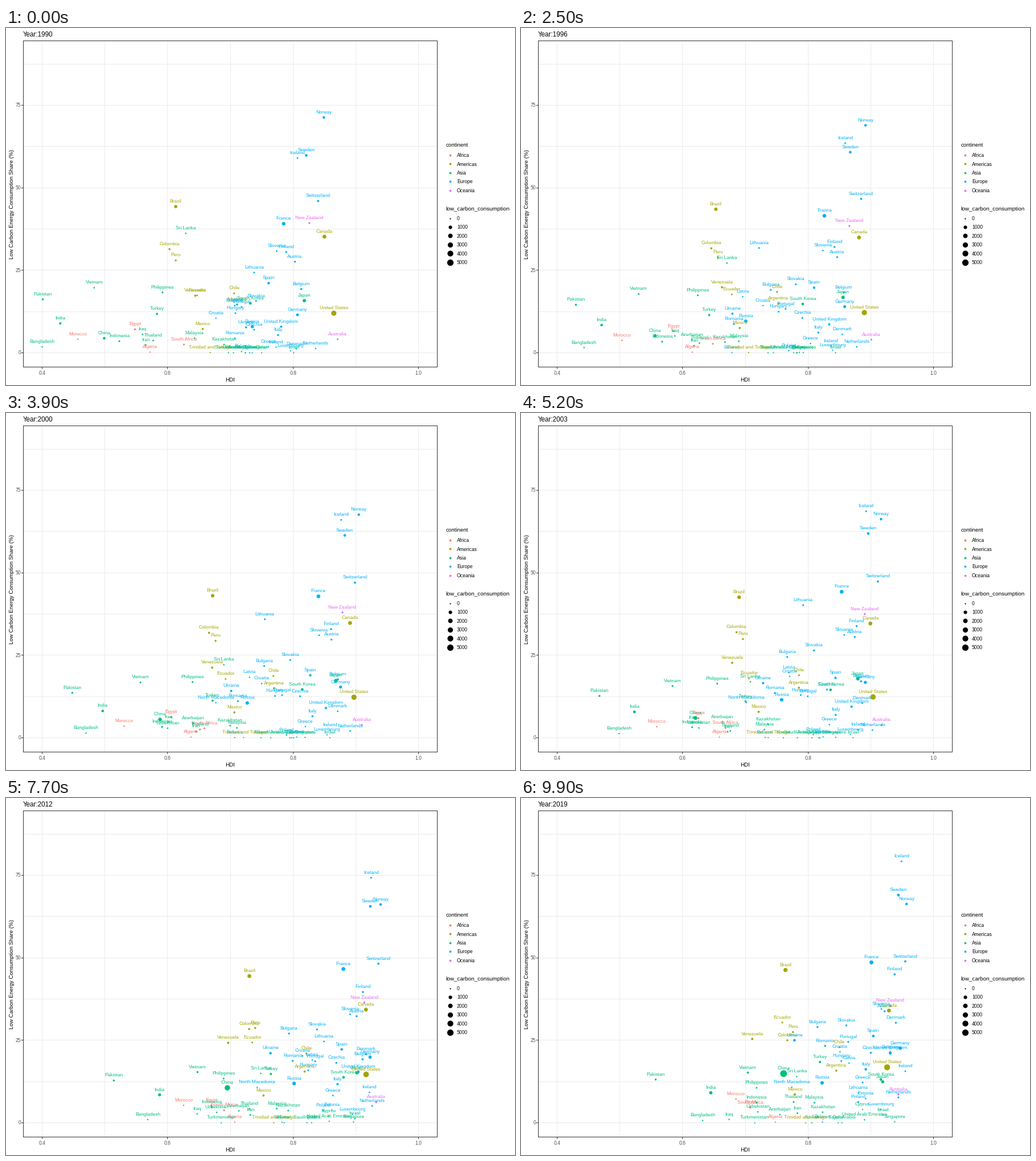
Animation, 894 px wide and 626 px high, one loop 10 s. Source, as a matplotlib script:

```python
import math

import matplotlib.pyplot as plt
import numpy as np
from matplotlib.animation import FuncAnimation

W, H, DPI = 894, 626, 100
FRAMES, INTERVAL = 100, 100
FIRST, MIDDLE, LAST = 1990, 2004, 2019
PX = 72 / DPI  # points per pixel

AFRICA, AMERICAS, ASIA = "#F8766D", "#A3A500", "#00BF7D"
EUROPE, OCEANIA = "#00B0F6", "#E76BF3"
GRID, DARK, GREY = "#EBEBEB", "#333333", "#4D4D4D"
LEFT, RIGHT, TOP, BOTTOM = 30, 757, 22, 594

plt.rcParams.update({"font.family": "Liberation Sans", "text.hinting": "native"})

fig = plt.figure(figsize=(W / DPI, H / DPI), dpi=DPI, facecolor="white")
ax = fig.add_axes((0, 0, 1, 1))
ax.set(xlim=(0, W), ylim=(H, 0))
ax.axis("off")


def stage_x(hdi):
    return 63.5 + 1101.7 * (hdi - 0.4)


def stage_y(share):
    return 569.5 - 5.787 * share


def diameter(consumption):
    return 2.2 + 0.127 * math.sqrt(consumption)


def text(x, y, s, size, color="black", ha="left", va="baseline", **kw):
    return ax.text(x, y, s, fontsize=size * PX, color=color, ha=ha, va=va, **kw)


def line(xs, ys, color, z=1):
    """One-pixel line through pixel centres."""
    xs, ys = np.floor(xs) + 0.5, np.floor(ys) + 0.5
    ax.plot(xs, ys, color=color, lw=PX, zorder=z, snap=False, solid_capstyle="projecting")


def dots(x, y, diam, color):
    return ax.scatter(x, y, s=(np.asarray(diam) * PX) ** 2, c=color, linewidths=0, zorder=3)


class Country:
    """Moves from one (HDI, share) point to another; via is a share on the way."""

    def __init__(self, name, color, begin, end, via=None, energy=300, growth=1, dip=0, start=FIRST):
        self.name, self.color, self.start = name, color, start
        (self.hdi, s0), (self.hdi_end, s1) = begin, end
        self.shares = (s0, (s0 + s1) / 2 if via is None else via, s1)
        self.energy, self.growth, self.dip = energy, growth, dip
        self.label = text(0, 0, name, 8.4, color, "center", zorder=5)

    def at(self, year):
        u = max(0, (year - self.start) / (LAST - self.start))
        # Highly developed countries gain early, the others steadily
        hdi = self.hdi + (self.hdi_end - self.hdi) * u ** (1.54 - 1.1 * self.hdi)
        t = (year - FIRST) / 6
        hdi -= self.dip * (t * math.exp(1 - t)) ** 2
        share = np.interp(year, (FIRST, MIDDLE, LAST), self.shares)
        used = self.energy * (1 + (self.growth - 1) * u) * share / 100
        return stage_x(hdi), stage_y(share), diameter(used)


DIP = 0.063  # setback of the nineties

countries = [
    Country("Algeria", AFRICA, (0.572, 0.2), (0.748, 0.2)),
    Country("Argentina", AMERICAS, (0.711, 14.6), (0.845, 15.8), energy=800),
    Country("Australia", OCEANIA, (0.871, 4.1), (0.944, 8.6), via=3.8, energy=1400),
    Country("Austria", EUROPE, (0.803, 27.6), (0.922, 33.8)),
    Country("Azerbaijan", ASIA, (0.604, 3.3), (0.755, 2.5), via=4.8, start=1995),
    Country("Bangladesh", ASIA, (0.4, 1.8), (0.632, 0.7)),
    Country("Belarus", EUROPE, (0.664, 0), (0.823, 0.2), start=1995),
    Country("Belgium", EUROPE, (0.813, 19.3), (0.931, 21.4), via=17, energy=750),
    Country("Brazil", AMERICAS, (0.613, 44.3), (0.764, 46.3), via=42.5, energy=1700, growth=2),
    Country("Bulgaria", EUROPE, (0.707, 14.3), (0.815, 29), via=25),
    Country("Canada", AMERICAS, (0.85, 35.2), (0.929, 34), energy=3700),
    Country("Chile", AMERICAS, (0.706, 18), (0.85, 22.9), via=19),
    Country("China", ASIA, (0.499, 4.4), (0.761, 14.9), via=6.1, energy=7900, growth=5),
    Country("Colombia", AMERICAS, (0.603, 31.4), (0.767, 25), via=32, energy=400),
    Country("Croatia", EUROPE, (0.677, 10.5), (0.851, 21.5), via=19, energy=50),
    Country("Cyprus", ASIA, (0.731, 0), (0.887, 4), via=0, energy=30),
    Country("Czechia", EUROPE, (0.738, 7), (0.9, 21.2), via=15, energy=480),
    Country("Denmark", EUROPE, (0.805, 1.2), (0.94, 30.3), via=11),
    Country("Ecuador", AMERICAS, (0.647, 17.4), (0.759, 30.4), via=18, energy=150),
    Country("Egypt", AFRICA, (0.548, 7.1), (0.708, 4.7), energy=900),
    Country("Estonia", EUROPE, (0.735, 0), (0.892, 7.3), via=0.3, energy=50),
    Country("Finland", EUROPE, (0.789, 30.5), (0.938, 45), via=34),
    Country("France", EUROPE, (0.785, 39.1), (0.901, 48.6), via=44.5, energy=2800),
    Country("Germany", EUROPE, (0.807, 11.5), (0.947, 22.6), energy=4000),
    Country("Greece", EUROPE, (0.761, 1.8), (0.887, 12.2), via=4.1),
    Country("Hungary", EUROPE, (0.708, 12), (0.853, 18.7), via=13),
    Country("Iceland", EUROPE, (0.807, 59), (0.949, 79.2), energy=60),
    Country("India", ASIA, (0.429, 8.9), (0.645, 9.1), via=7.8, energy=2600, growth=3.5),
    Country("Indonesia", ASIA, (0.523, 3.5), (0.718, 6.1), via=3.2, energy=1500),
    Country("Iran", ASIA, (0.565, 2.4), (0.783, 2.9), via=1.8, energy=1500),
    Country("Iraq", ASIA, (0.56, 5.6), (0.674, 1), via=4.5),
    Country("Ireland", EUROPE, (0.773, 1.7), (0.955, 15.6), via=2.5, energy=180),
    Country("Israel", ASIA, (0.801, 0), (0.919, 2.4), via=0),
    Country("Italy", EUROPE, (0.776, 5.4), (0.892, 16.2), via=7, energy=1900),
    Country("Japan", ASIA, (0.818, 15.8), (0.919, 12.4), via=18, energy=5500),
    Country("Kazakhstan", ASIA, (0.69, 2.5), (0.824, 3.2), via=4.2, energy=700, dip=DIP),
    Country("Kuwait", ASIA, (0.705, 0), (0.806, 0)),
    Country("Latvia", EUROPE, (0.71, 14.6), (0.866, 18.1), via=20, energy=40, dip=DIP),
    Country("Lithuania", EUROPE, (0.738, 24.3), (0.881, 9), via=41, energy=130, dip=DIP),
    Country("Luxembourg", EUROPE, (0.796, 0.6), (0.916, 4.1), via=1, energy=45),
    Country("Malaysia", ASIA, (0.643, 4.4), (0.81, 6.1), via=2.4, energy=800),
    Country("Mexico", AMERICAS, (0.656, 7.2), (0.779, 8.6), energy=1800),
    Country("Morocco", AFRICA, (0.457, 4.1), (0.685, 7.2), via=3.3, energy=120),
    Country("Netherlands", EUROPE, (0.836, 1.3), (0.944, 7.7), via=2.4, energy=1000),
    Country("New Zealand", OCEANIA, (0.826, 39.3), (0.931, 35.5), energy=220),
    Country("North Macedonia", EUROPE, (0.677, 10.5), (0.774, 10.8), energy=30, start=2000),
    Country("Norway", EUROPE, (0.849, 71.3), (0.957, 66.3), via=66, energy=500),
    Country("Pakistan", ASIA, (0.401, 16.2), (0.557, 13.1), via=12.5, energy=700),
    Country("Peru", AMERICAS, (0.613, 28), (0.776, 27.5), via=30),
    Country("Philippines", ASIA, (0.592, 18.3), (0.718, 10.6), via=16.3),
    Country("Poland", EUROPE, (0.718, 0.4), (0.88, 6.3), via=1, energy=1100),
    Country("Portugal", EUROPE, (0.718, 13.9), (0.864, 24.5), via=12.5),
    Country("Qatar", ASIA, (0.75, 0), (0.848, 0)),
    Country("Romania", EUROPE, (0.707, 4.4), (0.828, 23.3), via=14, energy=500, dip=DIP),
    Country("Russia", EUROPE, (0.735, 7.9), (0.823, 12.1), via=11.7, energy=8500, dip=DIP),
    Country("Saudi Arabia", ASIA, (0.697, 0), (0.854, 0)),
    Country("Singapore", ASIA, (0.724, 0), (0.938, 0.3)),
    Country("Slovakia", EUROPE, (0.741, 15.7), (0.861, 29.5), via=27),
    Country("Slovenia", EUROPE, (0.774, 30.8), (0.917, 34.5), via=31.2, energy=90),
    Country("South Africa", AFRICA, (0.626, 2.5), (0.708, 4.6), via=3, energy=1400),
    Country("South Korea", ASIA, (0.732, 15), (0.916, 13.1), via=14.5, energy=2500),
    Country("Spain", EUROPE, (0.761, 21.1), (0.904, 26.3), via=18, energy=1500),
    Country("Sri Lanka", ASIA, (0.629, 36.2), (0.782, 14), via=16, energy=40),
    Country("Sweden", EUROPE, (0.821, 59.8), (0.944, 69), via=62, energy=620),
    Country("Switzerland", EUROPE, (0.84, 46), (0.955, 48.9), energy=340),
    Country("Thailand", ASIA, (0.577, 3.7), (0.777, 6.3), via=2, energy=900),
    Country("Trinidad and Tobago", AMERICAS, (0.668, 0.1), (0.796, 0)),
    Country("Turkey", ASIA, (0.583, 11.8), (0.819, 18.4), via=11, energy=1200),
    Country("Turkmenistan", ASIA, (0.675, 0), (0.715, 0), start=2010),
    Country("Ukraine", EUROPE, (0.725, 7.7), (0.779, 25), via=17, energy=1500, dip=DIP),
    Country("United Arab Emirates", ASIA, (0.724, 0), (0.89, 0.9), via=0),
    Country("United Kingdom", EUROPE, (0.781, 7.9), (0.931, 21.1), via=9.5, energy=2500),
    Country("United States", AMERICAS, (0.865, 12), (0.926, 16.8), via=12.4, energy=25000),
    Country("Uzbekistan", ASIA, (0.6, 2.7), (0.72, 3.3), start=2000),
    Country("Venezuela", AMERICAS, (0.644, 17.3), (0.711, 25.4), via=23, energy=800),
    Country("Vietnam", ASIA, (0.483, 19.7), (0.704, 15.2), via=15.5, energy=60, growth=15),
]

# Panel, grid and axes
for i in range(7):
    hdi = 0.4 + i / 10
    x = stage_x(hdi)
    line((x, x), (TOP, BOTTOM), GRID)
    if i % 2 == 0:
        line((x, x), (BOTTOM, BOTTOM + 3), DARK)
        text(x, 607.5, f"{hdi:.1f}", 8.7, GREY, "center")
for i in range(8):
    share = 12.5 * i
    y = stage_y(share)
    line((LEFT, RIGHT), (y, y), GRID)
    if i % 2 == 0:
        line((LEFT - 3, LEFT), (y, y), DARK)
        text(26.5, y + 3, f"{share:.0f}", 8.7, GREY, "right")
line((LEFT, RIGHT, RIGHT, LEFT, LEFT), (TOP, TOP, BOTTOM, BOTTOM, TOP), DARK, z=6)

text(394, 620, "HDI", 9.6, ha="center")
text(10.5, 309, "Low Carbon Energy Consumption Share (%)", 9.8, ha="center", va="center", rotation=90)
title = text(30, 15, "", 11.7)

# Legends
text(772.5, 208.5, "continent", 9.8)
continents = {"Africa": AFRICA, "Americas": AMERICAS, "Asia": ASIA, "Europe": EUROPE, "Oceania": OCEANIA}
for i, (name, color) in enumerate(continents.items()):
    y = 222.5 + 15.5 * i
    dots([780], [y], [3.8], color)
    text(792, y + 3.5, name, 8.6)
text(772, 320.5, "low_carbon_consumption", 9.9)
for i in range(6):
    y = 333.5 + 15.45 * i
    dots([780], [y], [diameter(1000 * i)], "black")
    text(792, y + 3.5, str(1000 * i), 8.6)

n = len(countries)
points = dots(np.zeros(n), np.zeros(n), np.ones(n), [c.color for c in countries])


def year_at(i):
    """Four steps per year up to 2002, three afterwards."""
    return FIRST + i / 4 if i <= 48 else 2002 + (i - 48) / 3


def update(i):
    year = year_at(i)
    title.set_text(f"Year:{math.ceil(year - 0.5)}")
    offsets, sizes = [], []
    for c in countries:
        x, y, diam = c.at(year)
        shown = year > c.start - 0.75
        c.label.set_position((x, y - 7))
        c.label.set_visible(shown)
        offsets.append((x, y))
        sizes.append((diam * PX) ** 2 if shown else 0)
    points.set_offsets(offsets)
    points.set_sizes(sizes)
    return [title, points, *(c.label for c in countries)]


anim = FuncAnimation(fig, update, frames=FRAMES, interval=INTERVAL, repeat=True, repeat_delay=0)
plt.show()
```
